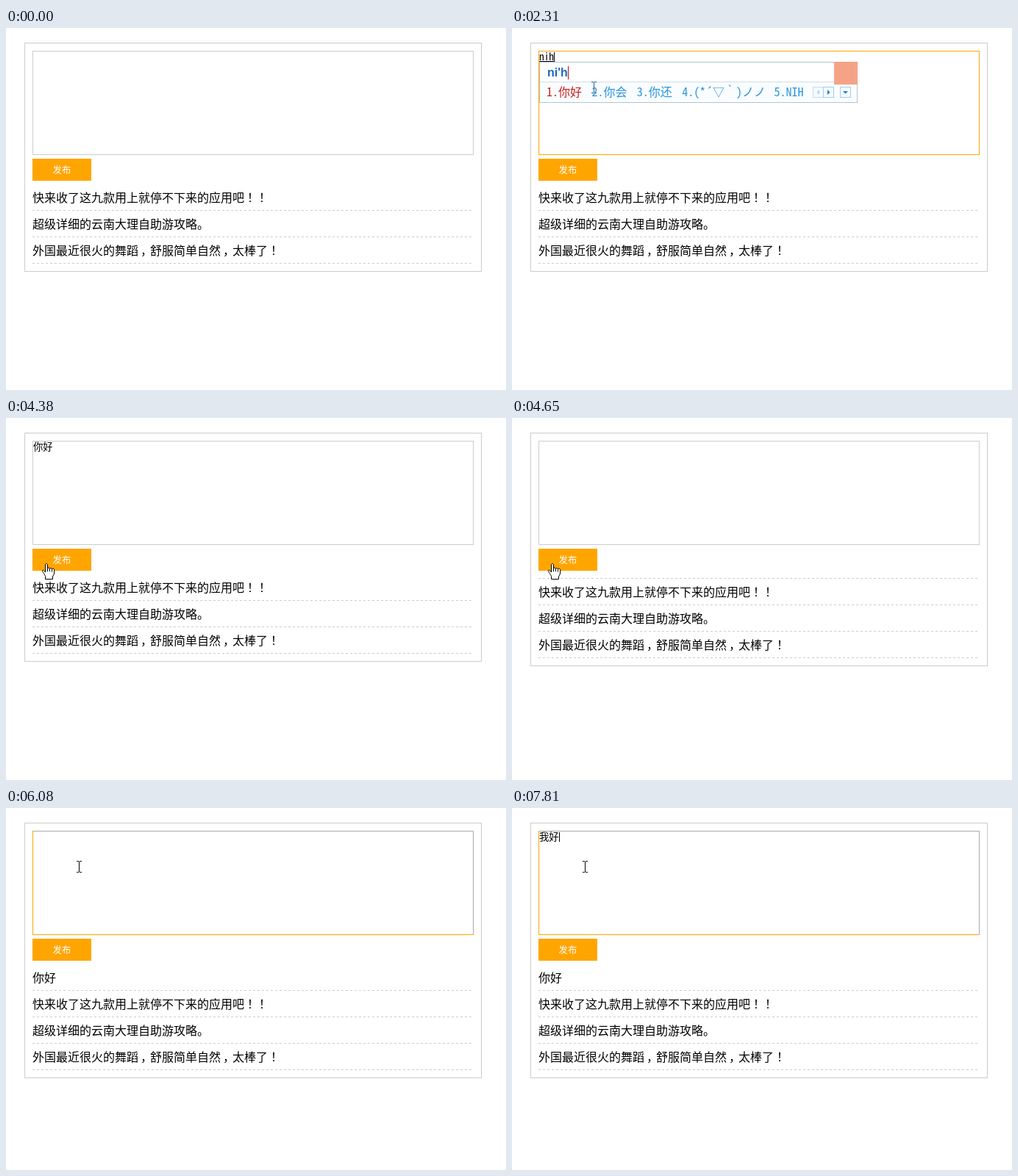
Write an HTML page that moves like this. It is 680x493 px and loops after 8000 ms.

```html
<!DOCTYPE html>
<html lang="zh-CN">
<head>
<meta charset="utf-8">
<style>
html, body { margin: 0; width: 100%; height: 100%; overflow: hidden; background: #fff; }
svg { display: block; }
text { font-family: "Noto Sans CJK SC", "Noto Sans CJK", sans-serif; }
.row { font-size: 16px; }
.field { font: 13.333px "Noto Sans Mono CJK SC", "Noto Sans CJK SC", monospace; }
.cand { font: 300 16px "Noto Sans Mono CJK SC", "Noto Sans CJK SC", monospace; fill: #0a84d6; fill-opacity: .88; }
.pinyin { font: bold 16px "Liberation Sans", Arial, sans-serif; fill: #1a6ac0; }
.line { fill: none; stroke: #ccc; }
.dash { stroke: #ccc; stroke-dasharray: 3 3; }
</style>
</head>
<body>
<svg id="stage" width="680" height="493" viewBox="0 0 680 493">
  <defs><clipPath id="reveal"><rect id="clip" x="36" y="213" width="600" height="0"/></clipPath></defs>
  <rect id="frame" class="line" x="25.5" y="20.5" width="621" height="311"/>
  <path id="topRight" class="line" d="M36 31.5H635.5V173"/>
  <path id="leftBottom" class="line" d="M36.5 31V172.5H636"/>
  <rect x="36" y="178" width="80" height="30" fill="#ffa500"/>
  <text x="76" y="198" font-size="12.4" font-weight="500" text-anchor="middle" fill="#fff">发布</text>
  <g id="fresh">
    <text class="row" x="36" y="237" clip-path="url(#reveal)">你好</text>
    <path id="freshLine" class="dash" d="M36 212.5H636"/>
  </g>
  <g id="list"></g>
  <text id="field" class="field" x="37" y="44"></text>
  <path id="under" stroke="#000"/>
  <rect id="caret" y="33" width="1" height="13"/>
  <g id="popup">
    <rect id="panel" x="37.5" y="46.5" height="55" fill="#fff" stroke="#b3c5d2"/>
    <rect id="strip" x="38" y="74" height="27" fill="#fafdff"/>
    <path id="split" stroke="#cfdde6"/>
    <text id="pinyin" class="pinyin" x="48" y="66"></text>
    <rect id="pinCaret" y="52" width="1" height="18" fill="#c00"/>
    <g id="cands"></g>
    <g id="tools">
      <g fill="#f4faff" stroke="#c4dff2">
        <rect x="-.5" y="80.5" width="14" height="14"/>
        <rect x="13.5" y="80.5" width="14" height="14" stroke="#a5cdec"/>
        <rect x="36.5" y="80.5" width="14" height="14" stroke="#a5cdec"/>
      </g>
      <path d="M8 84V91L4.5 87.5Z" fill="#b5d3ea"/>
      <path d="M19 84V91L22.5 87.5ZM40 86H47L43.5 89.5Z" fill="#1a7fd0"/>
      <rect x="28" y="46" width="32" height="31" fill="#f5a386"/>
    </g>
  </g>
  <path id="beam" fill="none" d="M-3-7.5H0M1-7.5H4M.5-7V7M-3 7.5H0M1 7.5H4"/>
  <path id="arrow" fill="#fff" stroke="#000" d="M.5 .5V16L4 12.7L6.5 18.5L9 17.5L6.6 11.8H11.5Z"/>
  <g id="hand" stroke="#000" stroke-linejoin="round">
    <path fill="#fff" d="M0 .5C-1.2 .5-1.5 1.3-1.5 2V12L-3.5 9.8C-4.7 8.7-6.2 9.3-5.5 10.8C-4.5 12.8-3 14-1.5 17.5V21.5H8.5V18L10.5 14V8.5C10.5 6.8 8 6.5 7.5 7.8C7.3 6.2 5 6 4.5 7.2C4.2 5.8 2 5.6 1.5 6.7V2C1.5 1.2 1 .5 0 .5Z"/>
    <path fill="none" d="M1.5 6.5V11M4.5 7V11M7.5 8V11.5"/>
  </g>
</svg>
<script>
const LOOP = 8000, NS = "http://www.w3.org/2000/svg";
const $ = id => document.getElementById(id);
const set = (id, attrs) => { for (const k in attrs) $(id).setAttribute(k, attrs[k]); };
const show = (id, on) => set(id, { visibility: on ? "visible" : "hidden" });
const between = (t, a, b) => t >= a && t < b;

function add(parent, tag, attrs, text) {
  const el = document.createElementNS(NS, tag);
  for (const k in attrs) el.setAttribute(k, attrs[k]);
  if (text) el.textContent = text;
  parent.appendChild(el);
  return el;
}

// centre these marks in their cells
const nudge = { "，": 3, "！": 4 };

["快来收了这九款用上就停不下来的应用吧！！", "超级详细的云南大理自助游攻略。", "外国最近很火的舞蹈，舒服简单自然，太棒了！"]
  .forEach((line, i) => {
    const text = add($("list"), "text", { class: "row", x: 36, y: 237 + i * 36 });
    let shift = 0;
    for (const part of line.split(/(，|！)/).filter(Boolean)) {
      const want = nudge[part] || 0;
      add(text, "tspan", { dx: want - shift }, part);
      shift = want;
    }
    add($("list"), "path", { class: "dash", d: `M36 ${248.5 + i * 36}H636` });
  });

// start time, typed letters, split letters, candidates
const typing = [
  [1970, "n", "n", ""],
  [2050, "n", "n", "你 呢 年 那 能"],
  [2200, "ni", "ni", "你 呢 尼 泥 逆"],
  [2310, "nih", "ni'h", "你好 你会 你还 (*´▽｀)ノノ NIH"],
  [2390, "niha", "ni'ha", "你哈 你好 你还 你害 你喊"],
  [2560, "nihao", "ni'hao", "你好 你好啊 你好吗 你好呀 你好哇"],
  [2870],
  [6640, "w", "w", "我 为 玩 文 无"],
  [6790, "wo", "wo", "我 窝 握 卧 沃"],
  [7250, "woh", "wo'h", "我会 我和 我好 我还 我很"],
  [7390, "woha", "wo'ha", "我哈 我还 我好 我喊 我害"],
  [7530, "wohao", "wo'hao", "我好 我号 我 窝 握"],
  [7810]
];

// time, x, y
const track = [
  [510, 640, 193], [720, 420, 130], [960, 180, 85], [1170, 111, 81],
  [3610, 111, 81], [3680, 111, 98], [3960, 80, 190], [4100, 62, 207], [4380, 55, 198],
  [4650, 55, 198], [4840, 61, 187], [5260, 99, 81], [5330, 99, 80], [LOOP, 99, 80]
];
// start, end, step of each stretch of pointer motion
const beats = [[510, 1170, 66], [3680, 4380, 70], [4460, 5330, 190 / 3]];

function hold(t) {
  const b = beats.find(([a, z]) => between(t, a, z));
  return b ? b[0] + Math.floor((t - b[0]) / b[2] + 0.01) * b[2] : t;
}

function pointerAt(t) {
  const i = Math.max(1, track.findIndex(p => p[0] > t));
  const [a, b] = [track[i - 1], track[i]];
  const k = (t - a[0]) / (b[0] - a[0]);
  return [1, 2].map(j => Math.round(a[j] + (b[j] - a[j]) * k));
}

function drawPointer(t, overPopup) {
  const [x, y] = pointerAt(t);
  const inField = between(x, 36, 636) && between(y, 31, 173);
  const inButton = between(x, 36, 116) && between(y, 178, 208);
  const kind = t < 510 ? "" : inField ? "beam" : inButton ? "hand" : "arrow";
  for (const id of ["beam", "hand", "arrow"]) {
    show(id, id === kind);
    set(id, { transform: `translate(${x} ${y})` });
  }
  set("beam", { stroke: overPopup ? "#2a5f8c" : "#000" });
}

const wide = s => [...s].reduce((n, c) => n + (c.charCodeAt(0) > 255 ? 2 : 1), 0);

let shown = null;
function drawPopup(step) {
  const open = !!(step && step[3]);
  show("popup", open);
  if (!open || step === shown) return;
  shown = step;
  $("pinyin").textContent = step[2];
  set("pinCaret", { x: Math.round(48 + $("pinyin").getComputedTextLength()) });
  $("cands").textContent = "";
  let x = 47;
  step[3].split(" ").forEach((word, i) => {
    const item = { class: "cand", y: 93 };
    if (!i) item.style = "fill:#c00000";
    add($("cands"), "text", { ...item, x }, i + 1 + ".");
    add($("cands"), "text", { ...item, x: x + 16 }, word);
    x += 29.4 + 8 * wide(word);
  });
  x = Math.round(x);
  set("panel", { width: x + 22 });
  set("strip", { width: x + 21 });
  set("split", { d: `M38 73.5H${x + 28}` });
  set("tools", { transform: `translate(${x})` });
}

function drawField(t) {
  const now = typing.filter(s => s[0] <= t).pop();
  const step = now && now[1] ? now : null;
  const value = step ? step[1] : between(t, 2870, 4500) ? "你好" : t >= 7810 ? "我好" : "";
  const end = 37 + wide(value) * 20 / 3;
  const focus = between(t, 1170, 4380) || t >= 5580;
  const start = [1170, 2870, 5580, 7810].filter(s => s <= t).pop();
  const blink = Math.floor((t - start) / (start === 1170 ? 550 : 500)) % 2 === 0;

  $("field").textContent = value;
  set("under", { d: step ? `M37 45.5H${end}` : "" });
  set("caret", { x: Math.round(end) });
  show("caret", focus && (step || blink));
  set("leftBottom", { style: focus ? "stroke:#ffa500" : "" });
  set("topRight", { style: focus ? `stroke:${t < 3680 ? "#ffa500" : "#aaa"}` : "" });
  drawPopup(step);
  return !!(step && step[3]);
}

function drawList(t) {
  const k = Math.min(1, Math.max(0, (t - 4551) / 370));
  const grow = Math.round(36 * (0.5 - Math.cos(Math.PI * k) / 2));
  show("fresh", grow > 0);
  set("clip", { height: grow });
  set("freshLine", { transform: `translate(0 ${grow})` });
  set("list", { transform: `translate(0 ${grow})` });
  set("frame", { height: 311 + grow });
}

function draw(t) {
  const open = drawField(t);
  const held = hold(t);
  drawList(held);
  drawPointer(held, open);
}

function tick() {
  draw(performance.now() % LOOP);
  requestAnimationFrame(tick);
}
tick();
</script>
</body>
</html>
```
